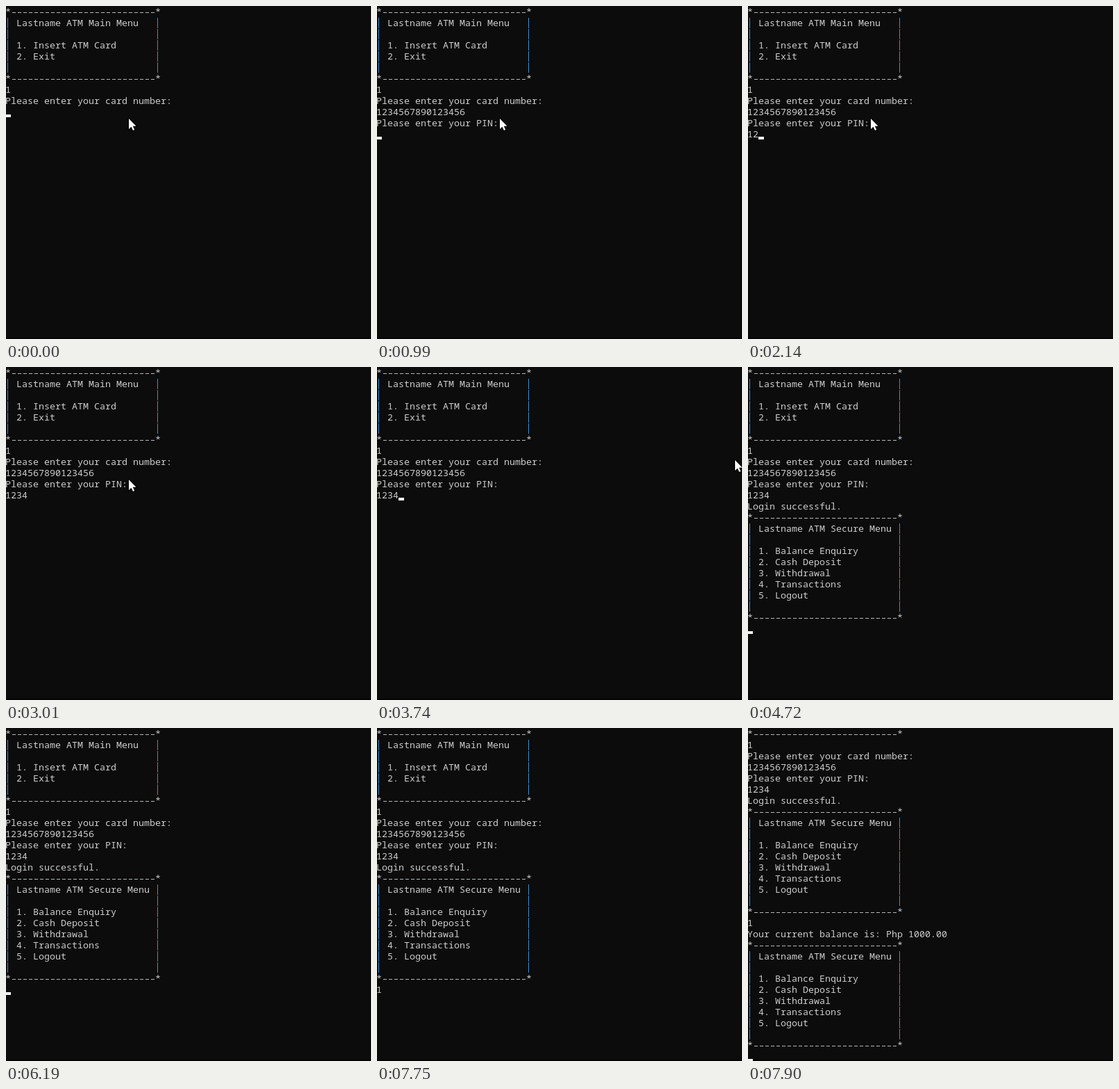
Write an HTML page with a canvas that moves like this. It is 526 by 479 pixels and loops after 8 s.

```html
<!DOCTYPE html>
<html lang="en">
<head>
<meta charset="utf-8">
<title>ATM console</title>
<style>
  html, body { margin: 0; width: 100%; height: 100%; overflow: hidden; background: #0c0c0c; }
  canvas { display: block; }
</style>
</head>
<body>
<canvas id="stage" width="526" height="479"></canvas>
<script>
const ctx = document.getElementById('stage').getContext('2d');
const LOOP = 8000, CELL_W = 8, CELL_H = 16, ROWS = 30;

const rule = '*' + '-'.repeat(26) + '*';
const box = (...lines) => [rule, ...lines.map(s => '| ' + s.padEnd(25) + '|'), rule];
const mainMenu = box('Lastname ATM Main Menu', '', '1. Insert ATM Card', '2. Exit', '');
const secureMenu = box('Lastname ATM Secure Menu', '', '1. Balance Enquiry', '2. Cash Deposit',
  '3. Withdrawal', '4. Transactions', '5. Logout', '');

// Console output: [time, text]; typed text carries no newline.
const output = [
  [0, [...mainMenu, '1', 'Please enter your card number:', ''].join('\n')],
  [320, '1234567890123456'],
  [990, '\nPlease enter your PIN:\n'],
  [2010, '1'], [2140, '2'], [2420, '3'], [2700, '4'],
  [4720, ['', 'Login successful.', ...secureMenu, ''].join('\n')],
  [7460, '1'],
  [7900, ['', 'Your current balance is: Php 1000.00', ...secureMenu, ''].join('\n')]
];

// Spans in which the text cursor is hidden.
const hidden = [[870, 990], [1860, 2010], [2420, 2700], [3010, 3470], [4010, 4570],
  [5630, 6190], [6650, 7180], [7750, 7900]];

// Mouse pointer: [time, x, y]; it leaves the window after the last stop.
const pointerStops = [[0, 177, 162], [3470, 208, 158], [3590, 311, 134], [3740, 516, 134], [3890, 600, 134]];
const pointerShape = new Path2D('M0 0V15L3.5 11.7L6 17L8.2 16L5.8 10.8H10.5Z');

function rect(color, x, y, w, h) {
  ctx.fillStyle = color;
  ctx.fillRect(x, y, w, h);
}

function drawChar(ch, x, y) {
  if (ch === '|') rect('#3a8fd8', x + 3, y + 1, 1, 15);
  else if (ch === '-') rect('#b4b8bc', x + 2, y + 9, 5, 1);
  else {
    ctx.fillStyle = '#cccccc';
    ctx.fillText(ch, x, y + 13);
  }
}

function draw(t) {
  rect('#0c0c0c', 0, 0, 526, 479);
  rect('#050505', 0, 477, 526, 2);
  ctx.font = '13.333px "Noto Sans Mono", "DejaVu Sans Mono", monospace';

  const text = output.filter(([at]) => t >= at).map(([, s]) => s).join('');
  const lines = text.split('\n').slice(-ROWS);
  lines.forEach((line, row) =>
    [...line].forEach((ch, col) => drawChar(ch, col * CELL_W - 1, row * CELL_H)));

  if (!hidden.some(([from, to]) => t >= from && t < to)) {
    const x = lines.at(-1).length * CELL_W - 1;
    rect('#f2f2f2', x, lines.length * CELL_H - 4, CELL_W, 4);
  }

  const [, px, py] = pointerStops.findLast(([at]) => t >= at);
  ctx.save();
  ctx.translate(px, py);
  ctx.lineWidth = 2;
  ctx.strokeStyle = '#000';
  ctx.stroke(pointerShape);
  ctx.fillStyle = '#fff';
  ctx.fill(pointerShape);
  ctx.restore();
}

function frame() {
  draw(performance.now() % LOOP);
  requestAnimationFrame(frame);
}
frame();
</script>
</body>
</html>
```
